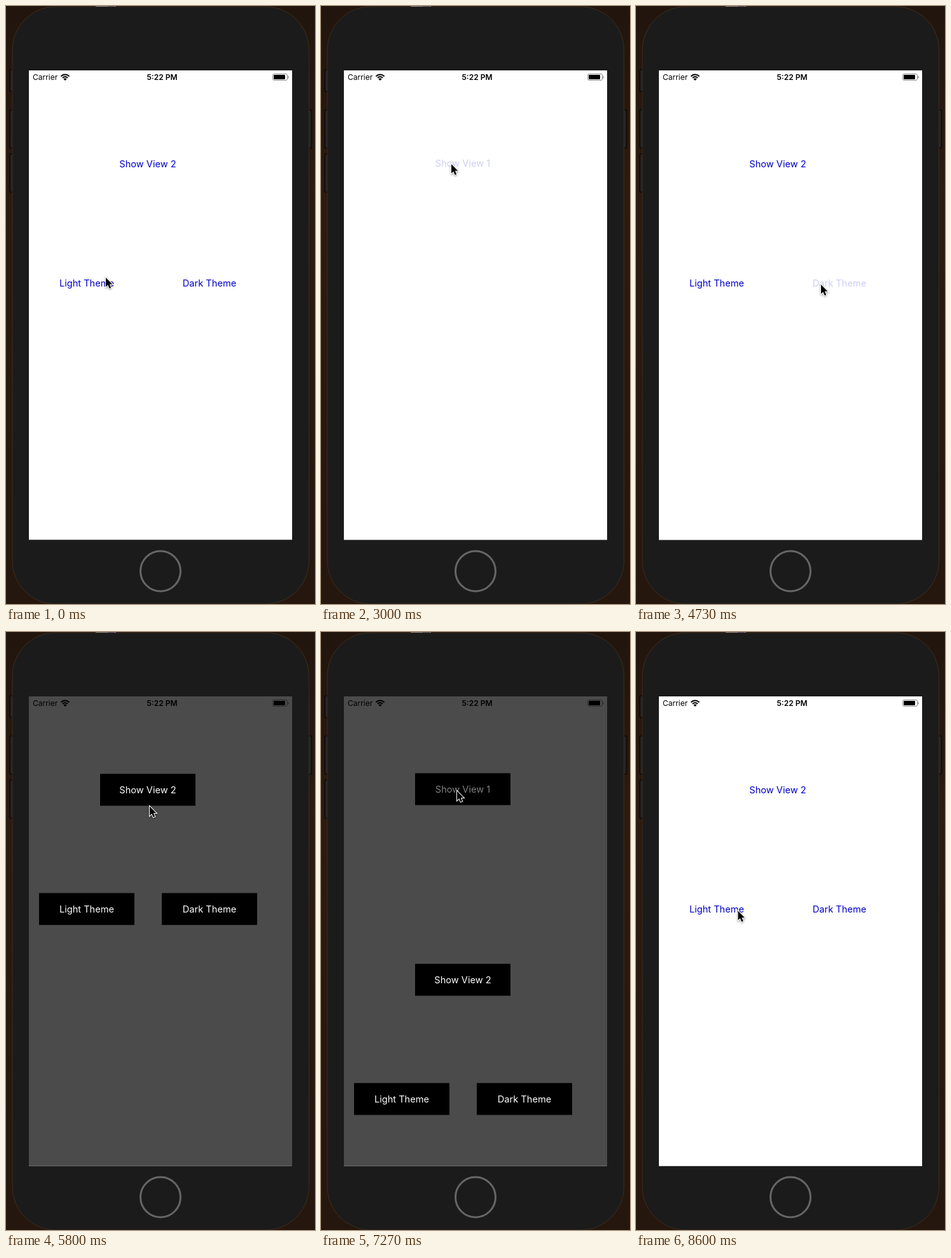
Write an HTML page with a canvas that moves like this. It is 486 px wide and 938 px high and loops after 9270 ms.

```html
<!DOCTYPE html>
<html lang="en">
<head>
<meta charset="utf-8">
<title>Theme switcher</title>
<style>
  html, body { margin: 0; width: 100%; height: 100%; overflow: hidden; background: #27190f; }
  canvas { display: block; }
</style>
</head>
<body>
<canvas id="stage" width="486" height="938"></canvas>
<script>
const ctx = document.getElementById('stage').getContext('2d');
const LOOP = 9270, FPS = 15;
const SCREEN = { x: 36, y: 101, w: 414, h: 736.5 };
const LIGHT = { view: '#fff', text: '0,0,200', box: null };
const DARK = { view: '#4b4b4b', text: '255,255,255', box: '#000' };

// Buttons: label, centre x, centre y
const VIEWS = {
  one: [['Show View 2', 223, 247.5], ['Light Theme', 127, 434.5], ['Dark Theme', 320, 434.5]],
  two: [['Show View 1', 223, 246.5]]
};
// Presented views: start time, view
const SLIDES = [[1970, 'two'], [3163, 'one'], [6235, 'two'], [7157, 'one']];
// Taps: label, down, up
const TAPS = [
  ['Light Theme', 595, 690], ['Show View 2', 1862, 2010], ['Show View 1', 2995, 3225],
  ['Dark Theme', 4728, 4756], ['Show View 2', 6128, 6290], ['Show View 1', 6995, 7225],
  ['Light Theme', 8328, 8420]
];
// Pointer: time, x, y
const PATH = [
  [0, 157, 426], [50, 157, 426], [133, 148, 438], [1000, 148, 438], [1333, 204, 236],
  [1467, 204, 236], [1667, 205, 248], [3500, 205, 248], [4300, 284, 450], [4533, 291, 437],
  [5335, 291, 437], [5800, 226, 273.5], [6067, 214, 249.5], [7270, 214, 249.5],
  [7600, 195, 290], [8133, 160.5, 437.5], [LOOP, 160.5, 437.5]
];

function roundRect(x, y, w, h, r, fill, stroke, line = 1) {
  ctx.beginPath();
  ctx.roundRect(x, y, w, h, r);
  if (fill) { ctx.fillStyle = fill; ctx.fill(); }
  if (stroke) { ctx.strokeStyle = stroke; ctx.lineWidth = line; ctx.stroke(); }
}

function label(text, x, y, font, color, align = 'center') {
  ctx.font = font + ' Inter, sans-serif';
  ctx.fillStyle = color;
  ctx.textAlign = align;
  ctx.fillText(text, x, y);
}

function drawPhone() {
  const wood = ctx.createLinearGradient(0, 0, 0, 938);
  wood.addColorStop(0, '#21150d');
  wood.addColorStop(0.3, '#2b1b10');
  wood.addColorStop(1, '#25170e');
  ctx.fillStyle = wood;
  ctx.fillRect(0, 0, 486, 938);
  ctx.fillStyle = '#e8e8f0';
  ctx.fillRect(141, 0, 32, 1.5);
  ctx.fillStyle = '#8c8cd0';
  ctx.fillRect(160, 0, 11, 1);
  for (const [x, y, h] of [[6, 100, 34], [6, 163, 60], [6, 232, 60], [474, 163, 60]])
    roundRect(x, y, 6.5, h, 2, '#242424', '#0c0a08', 1.5);
  roundRect(10, 1, 466.5, 937, 68, '#1b1b1b', '#3f2d1c');
  ctx.beginPath();
  ctx.arc(243, 886.5, 31.5, 0, 7);
  ctx.strokeStyle = '#666';
  ctx.lineWidth = 3;
  ctx.stroke();
}

function drawStatusBar(dark) {
  label('Carrier', 42, 116, '12px', '#000', 'left');
  label('5:22 PM', 245.5, 116, '600 12px', '#000');
  ctx.strokeStyle = ctx.fillStyle = '#000';
  ctx.lineWidth = 2;
  for (const r of [5.4, 9]) {
    ctx.beginPath();
    ctx.arc(93, 116.5, r, -Math.PI * 0.76, -Math.PI * 0.24);
    ctx.stroke();
  }
  ctx.beginPath();
  ctx.moveTo(93, 117);
  ctx.arc(93, 117, 3.6, -Math.PI * 0.76, -Math.PI * 0.24);
  ctx.fill();
  const rim = dark ? '#2c2c2c' : '#8a8a8a';
  roundRect(419.5, 106.5, 23, 10, 2.5, null, rim);
  roundRect(421, 108, 18, 7, 1, '#000');
  roundRect(443.5, 110, 1.3, 3.5, 0.6, rim);
}

function tapAlpha(name, t) {
  const tap = TAPS.find(([n, down, up]) => n === name && t >= down && t < up + 110);
  return tap ? 0.2 + 0.8 * Math.max(0, (t - tap[2]) / 110) : 1;
}

function drawView(name, offset, theme, t) {
  ctx.save();
  ctx.translate(0, offset);
  ctx.fillStyle = theme.view;
  ctx.fillRect(SCREEN.x, SCREEN.y, SCREEN.w, SCREEN.h);
  for (const [text, x, y] of VIEWS[name]) {
    if (theme.box) {
      ctx.fillStyle = theme.box;
      ctx.fillRect(x - 75, y - 25, 150, 50);
    }
    label(text, x, y + 5.5, '14.6px', `rgba(${theme.text},${tapAlpha(text, t)})`);
  }
  ctx.restore();
}

// Critically damped spring: remaining share of the distance
function springLeft(ms) {
  const p = 18.257 * ms / 1000;
  return (1 + p) * Math.exp(-p);
}

function pointerAt(t) {
  const i = PATH.findIndex(p => p[0] > t);
  const [t0, x0, y0] = PATH[i - 1], [t1, x1, y1] = PATH[i];
  const k = (t - t0) / (t1 - t0);
  return [x0 + (x1 - x0) * k, y0 + (y1 - y0) * k];
}

function drawPointer(x, y) {
  const arrow = new Path2D('M0 0V14.6L3.3 11.5L5.7 17L8.2 16L5.9 10.6H10.4Z');
  ctx.save();
  ctx.translate(x, y);
  ctx.shadowColor = 'rgba(0,0,0,.45)';
  ctx.shadowBlur = 3;
  ctx.shadowOffsetY = 1;
  ctx.strokeStyle = '#fff';
  ctx.lineWidth = 2;
  ctx.stroke(arrow);
  ctx.shadowColor = 'transparent';
  ctx.fillStyle = '#000';
  ctx.fill(arrow);
  ctx.restore();
}

function render(now) {
  const t = Math.floor((now % LOOP + 5) * FPS / 1000) * 1000 / FPS;
  const dark = t > 4860 && t < 8460;
  const theme = dark ? DARK : LIGHT;
  drawPhone();
  ctx.save();
  ctx.beginPath();
  ctx.rect(SCREEN.x, SCREEN.y, SCREEN.w, SCREEN.h);
  ctx.clip();
  drawView('one', 0, theme, t);
  for (const [start, name] of SLIDES)
    if (t > start) drawView(name, Math.round(736 * springLeft(t - start)), theme, t);
  drawStatusBar(dark);
  ctx.restore();
  if (dark) {
    ctx.fillStyle = '#999';
    for (let x = 36; x < 450; x += 2) ctx.fillRect(x, 837, 1, 1);
  }
  drawPointer(...pointerAt(t));
}

function tick() {
  render(performance.now());
  requestAnimationFrame(tick);
}
tick();
</script>
</body>
</html>
```
